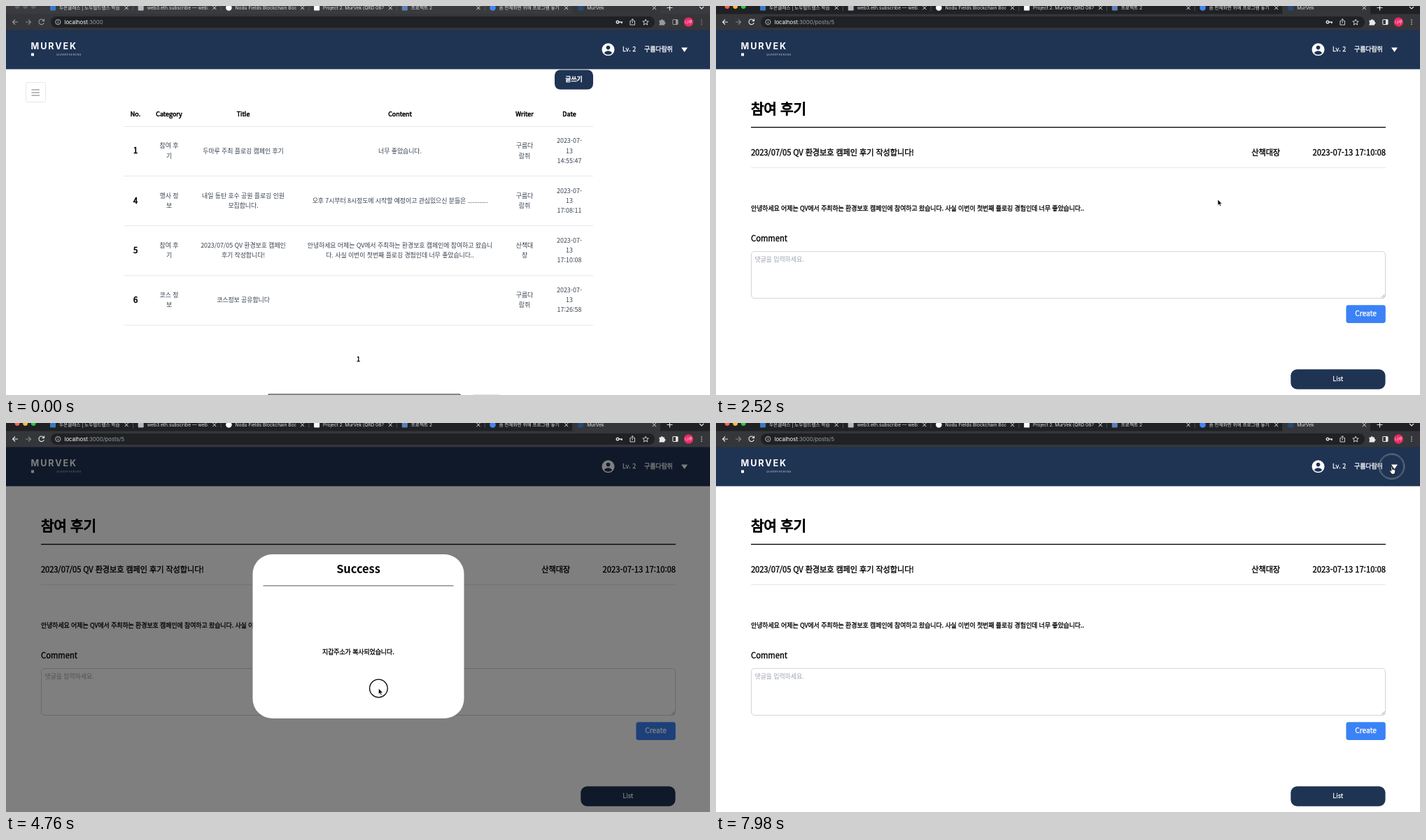
Write an HTML page that moves like this. It is 1006 px wide and 557 px high and loops after 8000 ms.

```html
<!DOCTYPE html>
<html lang="ko">
<head>
<meta charset="utf-8">
<style>
html, body { margin: 0; width: 100%; height: 100%; overflow: hidden; background: #fff }
svg { display: block }
text { font-family: "Noto Sans CJK KR", "Noto Sans CJK", "Noto Sans KR", sans-serif; white-space: pre }
.ui { font-family: Inter, Roboto, sans-serif }
</style>
</head>
<body>
<svg id="stage" width="1006" height="557" viewBox="0 0 1006 557"></svg>
<script>
const LOOP = 8000, STEP = 70;
const NAVY = '#1f3353', LINE = '#e5e7eb', INK = '#374151';
const BASE = 8.98, LARGE = 11.22;
const USER = '구름다람쥐', WALKER = '산책대장';

const rect = (x, y, w, h, fill, r = 0, more = '') =>
  `<rect x="${x}" y="${y}" width="${w}" height="${h}" rx="${r}" fill="${fill}" ${more}/>`;
const circle = (x, y, r, fill, more = '') =>
  `<circle cx="${x}" cy="${y}" r="${r}" fill="${fill}" ${more}/>`;
const stroke = (d, color, width = 1, more = '') =>
  `<path d="${d}" fill="none" stroke="${color}" stroke-width="${width}" ${more}/>`;

// y is the middle of the line; weights 500 and 600 are regular glyphs with a thin outline
function text(x, y, s, { size = BASE, weight = 400, fill = '#000', anchor = 'start', more = '' } = {}) {
  const outline = { 500: .03, 600: .055 }[weight];
  if (outline) more += ` stroke="${fill}" stroke-width="${size * outline}"`;
  if (/[가-힣]/.test(s)) more += ' letter-spacing="-.012em"';
  return `<text x="${x}" y="${y + size * .36}" font-size="${size}" font-weight="${outline ? 400 : weight}" fill="${fill}" text-anchor="${anchor}" ${more}>${s}</text>`;
}
const centered = (x, y, s, o) => text(x, y, s, { anchor: 'middle', ...o });
const ui = 'class="ui"';

function browser() {
  const tabs = [
    ['두온클래스 | 노두필드랩스 학습', '#3b78c4'], ['web3.eth.subscribe — web3.js', '#b8bcc2'],
    ['Nodu Fields Blockchain Bootc', '#fff'], ['Project 2. MurVek (QRD 08기)', '#fff'],
    ['프로젝트 2', '#5b7fb5'], ['솜 전체화면 위에 프로그램 놓기', '#4285f4'], ['MurVek', '#284a76']];
  let s = rect(0, 0, 1006, 13, '#202124', 0, 'id="strip"');
  s += rect(0, 11.5, 1006, 23, '#35363a') + rect(809, -6, 126, 20, '#35363a', 5);
  ['#ff5f57', '#febc2e', '#28c840'].forEach((c, i) => s += circle(16 + 11.6 * i, .6, 3.4, c, `class="light" data-color="${c}"`));
  tabs.forEach(([label, color], i) => {
    const x = 67 + 125.7 * i;
    s += i == 2 || i == 5 ? circle(x, 2.5, 4.3, color) : rect(x - 4, -1.5, 8, 8, color, 1);
    s += `<svg x="${x + 9}" y="0" width="87" height="11">${text(0, 2.6, label, { size: 6.7, fill: '#dfe1e5', more: ui })}</svg>`;
    s += stroke(`M${x + 102.7} .2l5 5m0-5l-5 5`, '#dfe1e5', 1);
    if (i < 5) s += stroke(`M${x + 114.5} 0v7`, '#5f6368', .7);
  });
  s += stroke('M944.5 2.5h8m-4-4v8M991 1l3 3 3-3', '#e8eaed', 1.1);
  s += rect(64, 15, 863, 16, '#202124', 8);
  s += stroke('M17 23H9.5m3.5-3.5L9.5 23l3.5 3.5', '#e8eaed', 1.1, 'class="tool"');
  s += stroke('M28 23h7.5m-3.5-3.5l3.5 3.5-3.5 3.5', '#85878b', 1.1);
  s += stroke('M53.8 20.8a3.7 3.7 0 1 0 .4 3M54.5 18.5v3h-3', '#e8eaed', 1.1, 'class="tool"');
  s += circle(74.3, 23, 3.6, 'none', 'stroke="#c6c9ce" stroke-width=".9"') + stroke('M74.3 22.5v2.5m0-4.2v.9', '#c6c9ce', .9);
  s += `<text class="ui" x="83.5" y="25.8" font-size="7.8" fill="#fff">localhost<tspan fill="#9aa0a6">:3000<tspan id="path"></tspan></tspan></text>`;
  s += circle(874, 23, 1.8, 'none', 'stroke="#dfe1e5" stroke-width="1.4"') + stroke('M876 23h5m-1.2 0v2', '#dfe1e5', 1.5);
  s += stroke('M893.5 21.5h-1.6v5.5h6.6v-5.5h-1.6M895.2 24.5v-6m-2 2l2-2 2 2', '#dfe1e5', .9);
  s += stroke('M914 19l1.2 2.8 3 .2-2.3 2 .8 3-2.7-1.7-2.7 1.7.8-3-2.3-2 3-.2z', '#dfe1e5', .9);
  s += '<path d="M933.5 20.5h2.3a1.5 1.5 0 0 1 3 0h2.2v2.3a1.5 1.5 0 0 1 0 3v1.7h-7.5v-2a1.5 1.5 0 0 0 0-2.5z" fill="#e8eaed" class="fillTool"/>';
  s += rect(952.8, 19.5, 7.2, 7, 'none', .5, 'stroke="#e8eaed" class="tool"') + rect(957, 19.5, 3, 7, '#e8eaed', 0, 'class="fillTool"');
  s += circle(975.4, 23, 6.7, '#e92a67') + centered(975.4, 23, '나루', { size: 5.6, fill: '#fff' });
  [20, 23, 26].forEach(y => s += circle(994, y, .8, '#e8eaed', 'class="fillTool"'));
  return s;
}

function header() {
  return rect(0, 34, 1006, 56.5, NAVY)
    + text(35.5, 57.8, 'MURVEK', { size: 12.6, weight: 700, fill: '#fff', more: 'class="ui" letter-spacing="1.9"' })
    + rect(36, 67.5, 4, 4, '#fff')
    + text(72, 69.6, 'QUARRYHERONS', { size: 3.6, fill: '#c7ced9', more: 'class="ui" letter-spacing=".5"' })
    + circle(860.5, 62.3, 9, '#fff') + circle(860.5, 59.6, 2.8, NAVY)
    + `<path d="M854.8 67.2q2-3 5.7-3t5.7 3q-2.3 2.5-5.7 2.5t-5.7-2.5z" fill="${NAVY}"/>`
    + text(881, 62, 'Lv. 2', { weight: 500, fill: '#fff' })
    + text(912, 62, USER, { weight: 500, fill: '#fff' })
    + '<path d="M965 59.5h9l-4.5 6.5z" fill="#fff"/>';
}

function board() {
  const columns = [185, 233, 339, 563, 741, 805];
  const half = USER.slice(0, 3) + '/' + USER.slice(3);
  const rows = [
    ['1', '참여 후/기', '두마루 주최 플로깅 캠페인 후기', '너무 좋았습니다.', half, '14:55:47'],
    ['4', '행사 정/보', '내일 동탄 호수 공원 플로깅 인원/모집합니다.', '오후 7시부터 8시정도에 시작할 예정이고 관심있으신 분들은 ............', half, '17:08:11'],
    ['5', '참여 후/기', '2023|07|05 QV 환경보호 캠페인/후기 작성합니다!', '안녕하세요 어제는 QV에서 주최하는 환경보호 캠페인에 참여하고 왔습니/다. 사실 이번이 첫번째 플로깅 경험인데 너무 좋았습니다..', '산책대/장', '17:10:08'],
    ['6', '코스 정/보', '코스정보 공유합니다', '', half, '17:26:58']];
  let s = rect(784, 91.5, 55, 28, NAVY, 8) + centered(811.5, 105, '글쓰기', { weight: 600, fill: '#fff' });
  s += rect(28.5, 109.5, 28, 28, '#fff', 2, `stroke="${LINE}"`) + stroke('M36.5 120h11.5m-11.5 4h11.5m-11.5 4h11.5', '#777', 1);
  s += rect(168, 315, 671, 71, LINE, 0, 'id="hover"');
  ['No.', 'Category', 'Title', 'Content', 'Writer', 'Date'].forEach((t, i) => s += centered(columns[i], 154.5, t, { weight: 600 }));
  s += stroke('M168 172.5h671', LINE);
  rows.forEach((row, r) => {
    const y = 207.3 + 71.2 * r;
    row.forEach((cell, c) => {
      const lines = (c == 5 ? '2023-07-/13/' + cell : cell).split('/');
      lines.forEach((line, i) => s += centered(columns[c], y + 14.1 * (i - (lines.length - 1) / 2),
        line.replaceAll('|', '/'), c ? { fill: INK } : { size: LARGE, weight: 600 }));
    });
    s += stroke(`M168 ${y + 36.2}h671`, LINE);
  });
  return s + centered(503.5, 506, '1', { weight: 600 })
    + rect(375, 556, 274, 20, '#fff', 1, 'stroke="#111" stroke-width="1.2"') + rect(667, 556, 39, 20, '#e4e4e4', 2);
}

function post() {
  return text(50, 148, '참여 후기', { size: 20.2, weight: 600 }) + rect(50, 173, 907, 1.3, '#000')
    + text(50, 210, '2023/07/05 QV 환경보호 캠페인 후기 작성합니다!', { size: LARGE, weight: 500 })
    + text(765.3, 210, WALKER, { size: LARGE, weight: 500 })
    + rect(765.5, 215.5, 41, 1, '#000', 0, 'id="underline"')
    + text(957, 210, '2023-07-13 17:10:08', { size: LARGE, weight: 500, anchor: 'end' })
    + stroke('M50 231.5h907', LINE)
    + text(50, 289.5, '안녕하세요 어제는 QV에서 주최하는 환경보호 캠페인에 참여하고 왔습니다. 사실 이번이 첫번째 플로깅 경험인데 너무 좋았습니다..', { weight: 500 })
    + text(50, 333, 'Comment', { size: LARGE, weight: 500 })
    + rect(50.5, 351.5, 906, 67, '#fff', 4.5, 'stroke="#d1d5db"')
    + text(55.5, 363.2, '댓글을 입력하세요.', { fill: '#9ca3af' })
    + stroke('M951 417.5l4.5-4.5m-2 4.5l2-2', '#777', .7)
    + rect(900.4, 428.3, 56.4, 25.7, '#3b82f6', 3.4) + centered(928.5, 440.3, 'Create', { size: 10.1, weight: 500, fill: '#fff' })
    + rect(821.3, 520.3, 135.2, 28.4, NAVY, 9) + centered(888.7, 534, 'List', { weight: 500, fill: '#fff' });
}

const modal = () => rect(0, 34, 1006, 523, '#000', 0, 'opacity=".5"')
  + rect(352.5, 188, 302, 235, '#fff', 28)
  + centered(503.5, 209, 'Success', { size: 16.4, weight: 700 })
  + stroke('M367.5 233h272', '#555', 1.1)
  + rect(553, 321, 2, 14, '#cfd6e2', 0, 'id="caret"')
  + centered(503.3, 328, '지갑주소가 복사되었습니다.', { weight: 500 });

const badge = () => circle(548.5, 344, 11.6, '#000', 'opacity=".06"') + circle(548.5, 343.8, 10.8, '#000', 'opacity=".09"')
  + circle(548.5, 343.2, 10, '#fff') + circle(548.5, 343, 5, '#0f2b46');

const pointer = () => '<path id="arrow" d="M0 0v8.5l2-1.8 1.3 3 1.5-.7-1.3-2.8h2.7z" fill="#000" stroke="#fff" stroke-width=".7"/>'
  + '<path id="hand" d="M-.8 1q0-1 .9-1t.9 1v3.2q.8-.6 1.5.1.9-.4 1.4.4 1.2-.2 1.2 1v2q0 1.2-1 2.2v1.2H-.5v-1q-1.5-1.3-2.7-3.7 0-1.2 1-.9l1.4 1.3z" fill="#fff" stroke="#000" stroke-width=".8" stroke-linejoin="round"/>';

const group = (id, body) => `<g id="${id}">${body}</g>`;
stage.innerHTML = rect(0, 0, 1006, 557, '#fff') + header() + group('board', board()) + group('post', post())
  + group('modal', modal()) + group('badge', badge()) + browser()
  + group('ring', circle(0, 0, 18.2, 'none', 'id="halo" stroke="#7d8795" stroke-width=".9"') + circle(0, 0, 16.8, 'none', 'id="rim"'))
  + group('pointer', pointer());

const $ = id => document.getElementById(id);
const show = (id, on) => $(id).setAttribute('visibility', on ? 'inherit' : 'hidden');
const within = (t, spans) => spans.some(([from, to]) => t >= from && t < to);

// time, x, y of the pointer tip
const path = [
  [210, 497, 504], [420, 595, 356], [630, 595, 356], [840, 608, 346], [2450, 608, 346], [2590, 826, 208],
  [2730, 826, 208], [3080, 781, 207], [3710, 781, 207], [3920, 546, 367], [4060, 546, 367], [4200, 532.4, 380],
  [4760, 532.4, 380], [4900, 538.8, 380.4], [6090, 538.8, 380.4], [6300, 680, 347], [6510, 687, 340],
  [6580, 691, 334], [6860, 713, 302], [7070, 713, 302], [7210, 1000, 10], [7280, 1000, 10],
  [7560, 971, 64], [7980, 965.6, 62.2]];
const smallRings = [[4200, 4410], [4760, 4900], [5110, 5390], [5670, 5810]];
const largeRings = [[980, 1260], [3220, 3360], [6370, 6440], [7910, 8000]];

function position(t) {
  const i = path.findIndex(p => p[0] >= t);
  if (i < 1) return path[i < 0 ? path.length - 1 : 0].slice(1);
  const [a, b] = [path[i - 1], path[i]], k = (t - a[0]) / (b[0] - a[0]);
  return [a[1] + (b[1] - a[1]) * k, a[2] + (b[2] - a[2]) * k];
}

function draw(t) {
  const focused = t >= 1050, onPost = t >= 2100, open = t >= 3430 && t < 6580;
  const [x, y] = position(t);
  show('board', !onPost);
  show('post', onPost);
  show('modal', open);
  show('underline', onPost && within(t, [[2940, 3430]]));
  $('path').textContent = onPost ? '/posts/5' : '';
  $('hover').setAttribute('opacity', Math.min(1, Math.max(0, (t - 1330) / 500)));

  const marked = within(t, [[4830, 5110], [5250, 5670], [5810, 6720]]);
  show('caret', open && marked);
  show('badge', marked);

  $('strip').setAttribute('fill', focused ? '#202124' : '#3a3b3e');
  document.querySelectorAll('.light').forEach(e => e.setAttribute('fill', focused ? e.dataset.color : '#5c5d60'));
  const tone = focused ? '#e8eaed' : '#97999d';
  document.querySelectorAll('.tool').forEach(e => e.setAttribute('stroke', tone));
  document.querySelectorAll('.fillTool').forEach(e => e.setAttribute('fill', tone));

  const small = within(t, smallRings), large = within(t, largeRings);
  const hand = within(t, [[1400, 2170], [2940, 3430], [7490, 8000]]);
  show('pointer', t >= 280);
  show('hand', t >= 280 && hand);
  show('arrow', t >= 280 && !hand);
  $('pointer').setAttribute('transform', `translate(${x} ${y})`);
  show('ring', small || large);
  show('halo', large);
  $('ring').setAttribute('transform', `translate(${x} ${y})`);
  $('rim').setAttribute('r', small ? 12.8 : 16.8);
  $('rim').setAttribute('stroke', small ? '#000' : '#59636f');
  $('rim').setAttribute('stroke-width', small ? 1.3 : 1);
}

function tick() {
  draw(Math.floor(performance.now() % LOOP / STEP) * STEP);
  requestAnimationFrame(tick);
}
tick();
</script>
</body>
</html>
```
